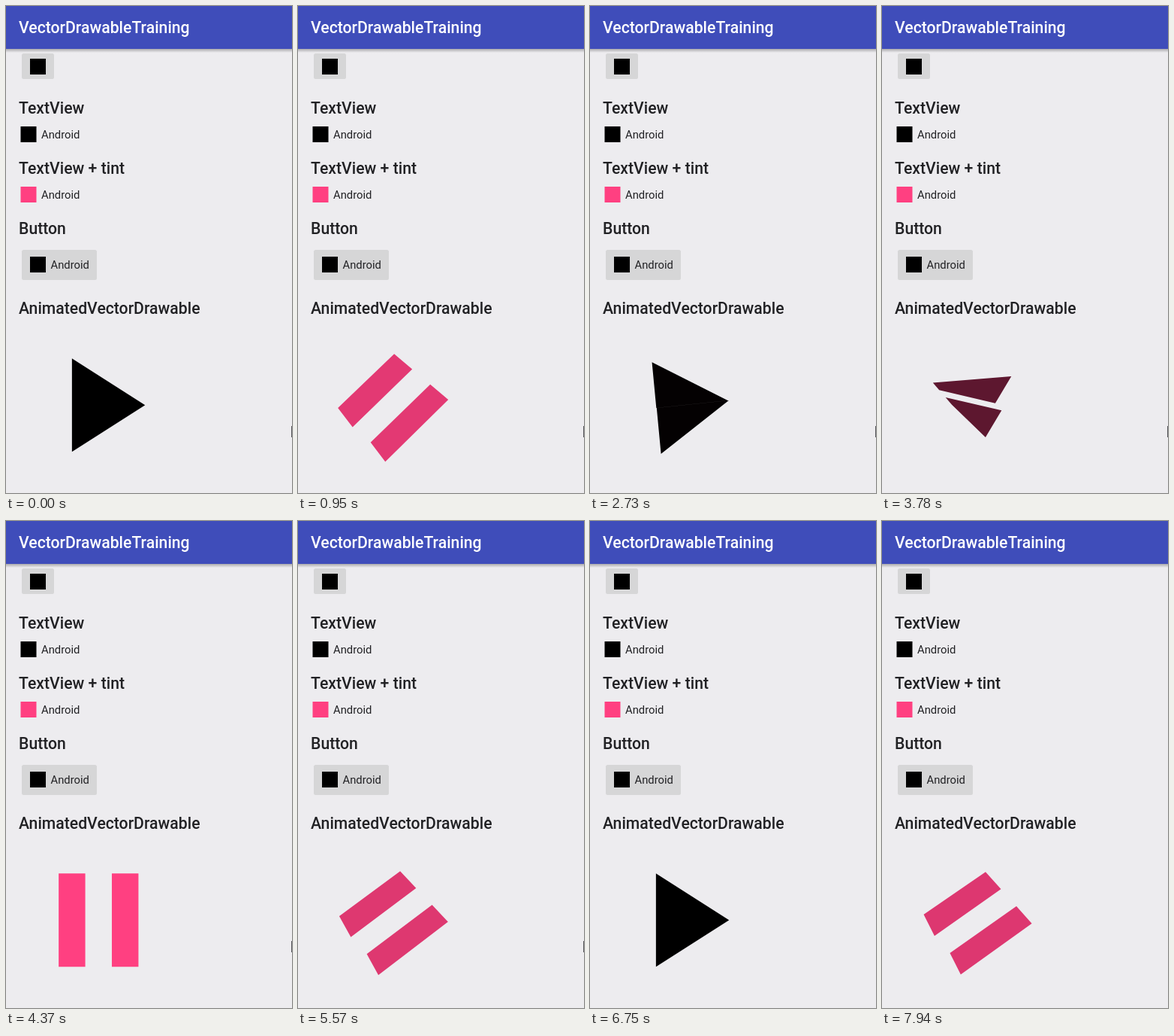
Write an HTML page with a canvas that moves like this. It is 381x647 px and loops after 8000 ms.

```html
<!DOCTYPE html>
<html lang="en">
<head>
<meta charset="utf-8">
<title>VectorDrawableTraining</title>
<style>
  html, body { margin: 0; width: 381px; height: 647px; overflow: hidden; background: #edecef; }
  canvas, svg { position: absolute; left: 0; top: 0; display: block; }
  text { font-family: Roboto, sans-serif; fill: #212124; }
  .head { font-size: 21.2px; font-weight: 500; }
  .body { font-size: 14.8px; }
  .bar { fill: #fff; }
</style>
</head>
<body>
<canvas id="stage" width="381" height="647"></canvas>
<svg width="381" height="647">
  <text class="head bar" x="17" y="36">VectorDrawableTraining</text>
  <text class="head" x="17" y="143.3">TextView</text>
  <text class="body" x="47" y="176.3">Android</text>
  <text class="head" x="17" y="223.3">TextView + tint</text>
  <text class="body" x="47" y="256.3">Android</text>
  <text class="head" x="17" y="303.3">Button</text>
  <text class="body" x="59.5" y="349.3">Android</text>
  <text class="head" x="17" y="409.2">AnimatedVectorDrawable</text>
</svg>
<script>
const W = 381, H = 647, LOOP = 8000, SPIN = 1000;
const ctx = document.getElementById('stage').getContext('2d');

// Icon halves on a 24-unit grid, relative to its centre.
const PLAY = [
  [[-4, -7], [7, 0], [7, 0], [-4, 0]],
  [[-4, 7], [7, 0], [7, 0], [-4, 0]]
];
const PAUSE = [
  [[-6, 7], [-6, -7], [-2, -7], [-2, 7]],
  [[6, 7], [6, -7], [2, -7], [2, 7]]
];
const CENTER = [123.3, 530.2], UNIT = 8.857;
const PINK = [255, 64, 129];

// Each toggle: when it began, whether it ends as pause, when the screen refreshed.
const TOGGLES = [
  { start: 167, toPause: true, ticks: [500, 650, 800, 950, 1090, 1240] },
  { start: 1805, toPause: false, ticks: [2280, 2430, 2580, 2730, 2880] },
  { start: 3368, toPause: true, ticks: [3780, 3930, 4080, 4220, 4370] },
  { start: 5336, toPause: false, ticks: [5570, 5710, 5860, 6010, 6150, 6300] },
  { start: 7178, toPause: true, ticks: [7640, 7790, 7940] }
];

const mix = (a, b, k) => a + (b - a) * k;
const ease = u => (1 - Math.cos(Math.PI * u)) / 2;

// 0 = play, 1 = pause
function morphAt(t) {
  let m = 0;
  for (const { start, toPause, ticks } of TOGGLES) {
    const tick = ticks.filter(x => x <= t).pop();
    if (tick === undefined) break;
    const u = (tick - start) / SPIN;
    const k = u > 0.95 ? 1 : ease(u);
    m = toPause ? k : 1 - k;
  }
  return m;
}

function roundBox(x, y, w, h) {
  ctx.fillStyle = '#d6d6d7';
  ctx.beginPath();
  ctx.roundRect(x, y, w, h, 2.5);
  ctx.fill();
}

function square(cx, cy, color) {
  ctx.fillStyle = color;
  ctx.fillRect(cx - 10.5, cy - 10.5, 21, 21);
}

function drawScreen() {
  ctx.fillStyle = '#edecef';
  ctx.fillRect(0, 0, W, H);

  const shade = ctx.createLinearGradient(0, 57, 0, 62);
  shade.addColorStop(0, 'rgba(0,0,0,.28)');
  shade.addColorStop(1, 'rgba(0,0,0,0)');
  ctx.fillStyle = shade;
  ctx.fillRect(0, 57, W, 5);
  ctx.fillStyle = '#3f4dba';
  ctx.fillRect(0, 0, W, 57);

  roundBox(21, 63, 43, 34);
  roundBox(21, 324, 100, 40);
  square(42.5, 80.5, '#000');
  square(30, 170.5, '#000');
  square(30, 250.5, '#ff4081');
  square(42.5, 343.5, '#000');
}

function drawIcon(m) {
  ctx.save();
  ctx.translate(...CENTER);
  ctx.rotate(2 * Math.PI * (1 - m));
  ctx.scale(UNIT, UNIT);
  ctx.fillStyle = `rgb(${PINK.map(c => Math.round(c * m))})`;
  ctx.beginPath();
  PLAY.forEach((half, i) => {
    half.forEach(([x, y], j) => {
      const [px, py] = PAUSE[i][j];
      ctx.lineTo(mix(x, px, m), mix(y, py, m));
      if (j === 0) ctx.moveTo(mix(x, px, m), mix(y, py, m));
    });
    ctx.closePath();
  });
  ctx.fill();
  ctx.restore();
}

function frame() {
  const t = performance.now() % LOOP;
  drawScreen();
  drawIcon(morphAt(t));
  if (t < 6750) {
    ctx.fillStyle = '#55555a';
    ctx.fillRect(380, 558, 1, 15);
  }
  requestAnimationFrame(frame);
}
frame();
</script>
</body>
</html>
```
